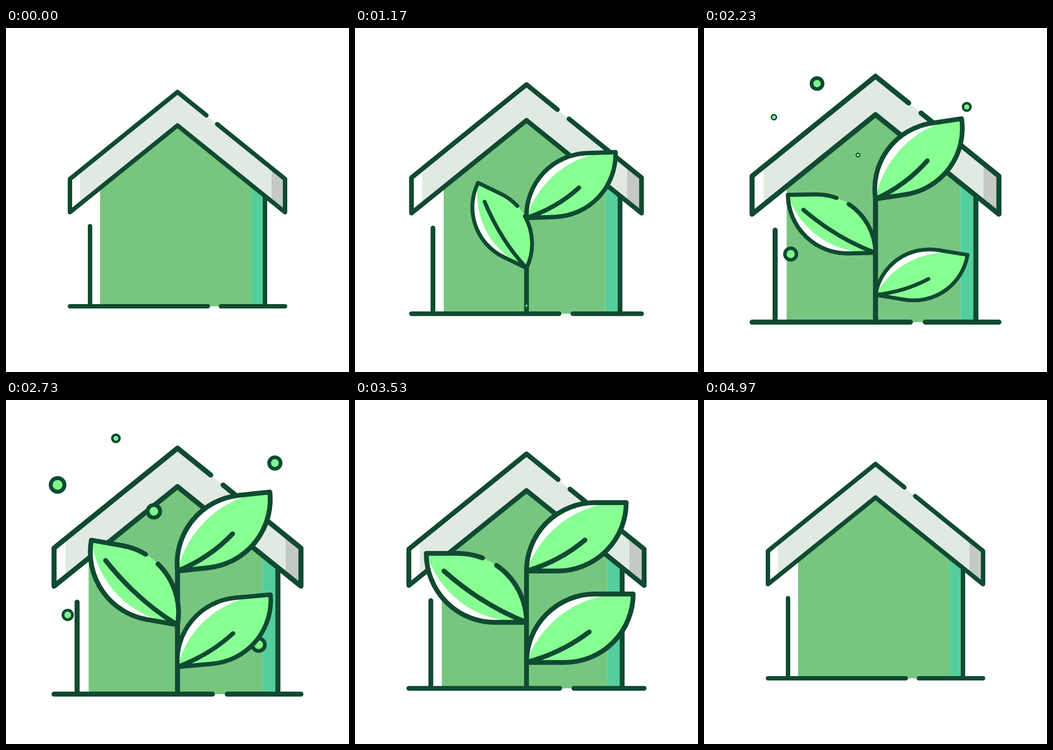
These frames come from a looping animation (700x704 px, 5.01 s). An HTML page without scripts:

```html
<!DOCTYPE html>
<html lang="en">
<head>
<meta charset="utf-8">
<title>Growing house</title>
<style>
html, body { margin: 0; width: 100%; height: 100%; overflow: hidden; background: #fff; }
svg { display: block; width: 700px; height: 704px; }

.line { fill: none; stroke: #104a31; stroke-width: 9; stroke-linecap: round; stroke-linejoin: round; }
.white { fill: #fff; }
.leaf { fill: #87ff93; }

/* the house and the plant breathe together */
.breath { transform-origin: 350px 350px; animation: breath 5010ms cubic-bezier(.333, 0, .667, 1) infinite; }
@keyframes breath {
  0%, 99.2%, 100% { scale: 1; }
  49.6% { scale: 1.152; }
}

.plant { animation: rise 5010ms infinite; }
@keyframes rise {
  0%, 4% { translate: 0 226px; animation-timing-function: cubic-bezier(.33, 0, .25, 1); }
  38% { translate: 0 0; }
  77% { translate: 0 0; animation-timing-function: cubic-bezier(.333, 0, .667, 1); }
  92.8%, 100% { translate: 0 226px; }
}

/* leaves unfold, swing back, settle, then fold away */
.top { animation: top 5010ms linear infinite; }
.left { animation: left 5010ms linear infinite; }
.low { animation: low 5010ms linear infinite; }
@keyframes top {
  0%, 6.4% { scale: 0; rotate: -60deg; animation-timing-function: cubic-bezier(.4, .1, .8, .9); }
  16% { scale: .83; rotate: -26deg; }
  19.2% { scale: 1.007; rotate: -15deg; }
  23.4% { scale: .936; rotate: -1.9deg; }
  28% { scale: .76; rotate: 9deg; }
  31.5% { scale: .73; rotate: 10deg; }
  35.3% { scale: .772; rotate: 5.8deg; }
  38.9% { scale: .886; rotate: -5.2deg; }
  46.9% { scale: .947; rotate: -10deg; }
  54.5% { scale: .958; rotate: -6.1deg; animation-timing-function: ease-in-out; }
  65.9% { scale: 1; rotate: 0deg; }
  76.9% { scale: 1; rotate: 0deg; animation-timing-function: cubic-bezier(.333, 0, .667, 1); }
  85.7%, 100% { scale: 0; rotate: 0deg; }
}
@keyframes left {
  0%, 14% { scale: 0; rotate: -60deg; animation-timing-function: cubic-bezier(.4, .1, .8, .9); }
  23.4% { scale: .827; rotate: -25.8deg; }
  26.7% { scale: 1.007; rotate: -15deg; }
  30.9% { scale: .936; rotate: -2deg; }
  35.3% { scale: .754; rotate: 9.2deg; }
  38.9% { scale: .73; rotate: 10deg; }
  42.9% { scale: .772; rotate: 6deg; }
  46.5% { scale: .886; rotate: -5deg; }
  54.5% { scale: .947; rotate: -10deg; animation-timing-function: ease-in-out; }
  65.9% { scale: 1; rotate: 0deg; }
  73.9% { scale: 1; rotate: 0deg; animation-timing-function: cubic-bezier(.333, 0, .667, 1); }
  82.7%, 100% { scale: 0; rotate: 0deg; }
}
@keyframes low {
  0%, 22.6% { scale: 0; rotate: -60deg; animation-timing-function: cubic-bezier(.4, .1, .8, .9); }
  32.1% { scale: .827; rotate: -26deg; }
  35.3% { scale: 1.007; rotate: -15.3deg; }
  39.5% { scale: .936; rotate: -2deg; }
  43.9% { scale: .76; rotate: 9deg; }
  47.5% { scale: .73; rotate: 10deg; }
  51.1% { scale: .79; rotate: 5deg; }
  54.5% { scale: .886; rotate: -5.2deg; }
  60.9% { scale: .96; rotate: -7deg; animation-timing-function: ease-in-out; }
  67.9% { scale: 1; rotate: 0deg; }
  70.9% { scale: 1; rotate: 0deg; animation-timing-function: cubic-bezier(.333, 0, .667, 1); }
  79.7%, 100% { scale: 0; rotate: 0deg; }
}

/* bubbles: --go is the drift, --at the birth time */
.fly { animation: fly 5010ms linear var(--at) infinite backwards; }
.fly circle { fill: #7cf78c; stroke: #104a31; stroke-width: 8; animation: pop 5010ms var(--at) infinite backwards; }
@keyframes fly {
  0% { translate: 0 0; }
  28%, 100% { translate: var(--go); }
}
@keyframes pop {
  0% { scale: 0; animation-timing-function: cubic-bezier(.3, .4, .7, 1); }
  14% { scale: 1; animation-timing-function: cubic-bezier(.3, 0, .7, .6); }
  28%, 100% { scale: 0; }
}
</style>
</head>
<body>
<svg viewBox="0 0 700 704">
  <defs>
    <clipPath id="soil"><path d="M0 0H700V570H0Z"/></clipPath>
  </defs>

  <g class="breath">
    <path fill="#77c680" d="M192 569.5V327L350 200L501 322V569.5Z"/>
    <path fill="#54cf9b" d="M501 569.5V320L528.5 343V569.5Z"/>
    <path class="line" d="M171.5 405.5V569.5M528.5 346V569.5M130.5 569.5H412M438.5 569.5H569.5"/>
    <path fill="#e0eae1" d="M151 292.4L350 131L542 286.7V354.8L350 200L151 360.5Z"/>
    <path fill="#c4c9c4" d="M542 286.7L569.5 309V377L542 354.8Z"/>
    <path class="line" d="M409 178.8L350 131L130.5 309V377L350 199.5L569.5 377V309L431 196.7"/>
  </g>

  <g transform="translate(238 154)"><g class="fly" style="--at:1660ms;--go:-18px -99px"><circle r="12"/></g></g>
  <g transform="translate(157 186)"><g class="fly" style="--at:2040ms;--go:-105px -25px"><circle r="14"/></g></g>
  <g transform="translate(528 183)"><g class="fly" style="--at:1900ms;--go:35px -91px"><circle r="12.5"/></g></g>
  <g transform="translate(318 270)"><g class="fly" style="--at:2080ms;--go:-35px -91px"><circle r="13"/></g></g>
  <g transform="translate(229 486)"><g class="fly" style="--at:1720ms;--go:-143px -64px"><circle r="13.5"/></g></g>
  <g transform="translate(454 542)"><g class="fly" style="--at:2140ms;--go:146px -98px"><circle r="13.5"/></g></g>

  <g class="breath">
    <g clip-path="url(#soil)">
      <g class="plant">
        <path class="line" d="M350 350V640"/>
        <g transform="translate(350 350)">
          <g class="top">
            <path class="white" d="M0 0A128 128 0 0 1 128-128H186A128 128 0 0 1 58 0Z"/>
            <path class="leaf" d="M0 0C20-60 80-122 165-128H186A128 128 0 0 1 58 0Z"/>
            <path class="line" d="M0 0A128 128 0 0 1 128-128H186A128 128 0 0 1 58 0ZQ62-18 109-58"/>
          </g>
        </g>
        <g transform="translate(350 446) scale(-1 1)">
          <g class="left">
            <path class="white" d="M0 0A128 129 0 0 1 128-129H187A128 129 0 0 1 59 0Z"/>
            <path class="leaf" d="M0 0A128 129 0 0 1 128-129H187C165-60 100 0 10-2Z"/>
            <path class="line" d="M56-106.6A128 129 0 0 0 0 0H59A128 129 0 0 0 187-129H128A128 129 0 0 0 82-120.4M0 0Q82-32 154-96"/>
          </g>
        </g>
        <g transform="translate(350 521)">
          <g class="low">
            <path class="white" d="M0 0A128 128 0 0 1 128-128H199A128 128 0 0 1 71 0Z"/>
            <path class="leaf" d="M0 0C20-60 80-122 170-128H199A128 128 0 0 1 71 0Z"/>
            <path class="line" d="M0 0A128 128 0 0 1 128-128H199A128 128 0 0 1 71 0ZQ66-18 117-57"/>
          </g>
        </g>
      </g>
    </g>
  </g>
</svg>
</body>
</html>
```
